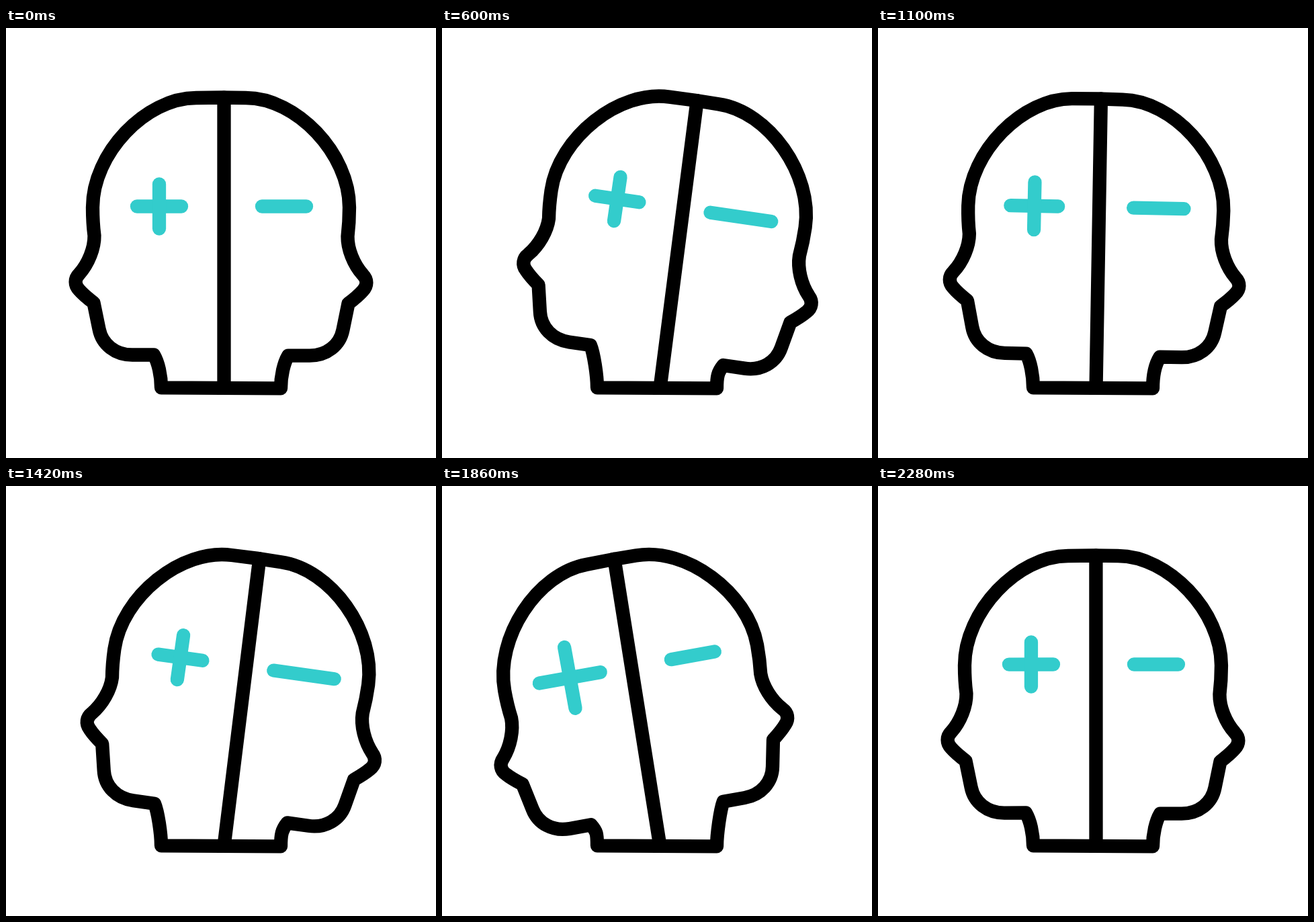
An HTML page with a canvas that plays this animation: 640 px wide and 640 px high, repeating every 2400 ms.

```html
<!DOCTYPE html>
<html lang="en">
<head>
<meta charset="utf-8">
<title>Two-faced head</title>
<style>
html, body { margin: 0; height: 100%; overflow: hidden; background: #fff; }
canvas { display: block; }
</style>
</head>
<body>
<canvas id="stage" width="640" height="640"></canvas>
<script>
const ctx = document.getElementById('stage').getContext('2d');
const LOOP = 2400;
const PIVOT_X = 320, PIVOT_Y = 486;

// Time in ms and tilt in degrees; the head swings from one to the next
const swings = [[200, 0], [605, 8.3], [905, -3.2], [1378, 8.4], [1840, -10.3], [2290, 0]];

const mix = (a, b, s) => a + (b - a) * s;
const mixPoint = (p, q, s) => [mix(p[0], q[0], s), mix(p[1], q[1], s)];

// Left profile from crown to neck; each bend heads for a corner, then its end
const profile = [[320, 103.5]];
function bend(end, corner = end, pull = 0.6) {
  const from = profile.at(-1);
  profile.push(mixPoint(from, corner, pull), mixPoint(end, corner, pull), end);
}
bend([283, 104]);
bend([129, 267], [129, 104], 0.49);   // skull
bend([131.5, 309], [129, 290]);
bend([109, 366], [132, 340]);         // brow
bend([109, 390], [97, 378]);          // nose
bend([130.5, 409], [116, 398]);
bend([138.5, 448]);
bend([188, 486.5], [146, 486.5]);     // chin
bend([220, 486.5]);
bend([231, 535.3], [231, 505]);       // neck

// The right profile mirrors the left and sits a touch lower
const mirrored = profile.map(([x, y]) => [640 - x, y > 300 ? y + 1.1 : y]).reverse();
const outline = [...profile, profile.at(-1), mirrored[0], ...mirrored];

function rotate([x, y], degrees) {
  const a = degrees * Math.PI / 180, dx = x - PIVOT_X, dy = y - PIVOT_Y;
  return [
    PIVOT_X + dx * Math.cos(a) - dy * Math.sin(a),
    PIVOT_Y + dx * Math.sin(a) + dy * Math.cos(a)
  ];
}

function swingAt(t) {
  const next = swings.findIndex(([time]) => time > t);
  if (next < 1) return { from: 0, to: 0, s: 0 };
  const [t0, from] = swings[next - 1], [t1, to] = swings[next];
  const u = (t - t0) / (t1 - t0);
  return { from, to, s: u * u * (3 - 2 * u) };
}

function draw(t) {
  const { from, to, s } = swingAt(t);

  // Points travel straight between tilts; the base of the neck stays put
  const place = p => p[1] > 500 ? p : mixPoint(rotate(p, from), rotate(p, to), s);
  const line = (p, q) => {
    ctx.beginPath();
    ctx.moveTo(...place(p));
    ctx.lineTo(...place(q));
    ctx.stroke();
  };
  // A sign grows with the lean towards its side
  const signArm = (side, gain) =>
    33 * (1 + gain * mix(Math.max(0, side * from), Math.max(0, side * to), s));
  const plus = signArm(-1, 0.039), minus = signArm(1, 0.047);

  ctx.clearRect(0, 0, 640, 640);
  ctx.lineWidth = 20.3;
  ctx.lineCap = ctx.lineJoin = 'round';

  ctx.strokeStyle = '#3cc';
  line([228 - plus, 265.5], [228 + plus, 265.5]);
  line([228, 265.5 - plus], [228, 265.5 + plus]);
  line([414 - minus, 265.5], [414 + minus, 265.5]);

  ctx.strokeStyle = '#000';
  line([324.5, 103.5], [324.5, 535.8]);
  const [start, ...curve] = outline.map(place);
  ctx.beginPath();
  ctx.moveTo(...start);
  while (curve.length > 2) ctx.bezierCurveTo(...curve.splice(0, 3).flat());
  ctx.closePath();
  ctx.stroke();
}

const began = performance.now();
function tick() {
  draw((performance.now() - began) % LOOP);
  requestAnimationFrame(tick);
}
tick();
</script>
</body>
</html>
```
